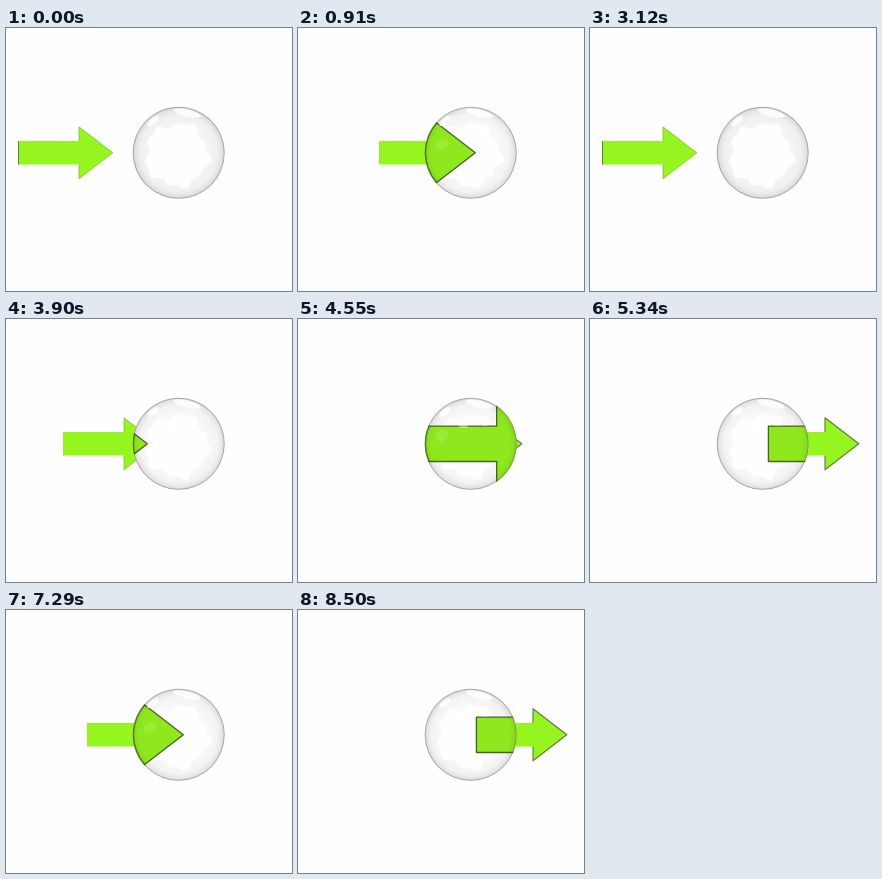
Animation, 286 px wide and 263 px high, one loop 8630 ms. Source, as an HTML page with a canvas:

```html
<!DOCTYPE html>
<html lang="en">
<head>
<meta charset="utf-8">
<title>Arrow through a glass ball</title>
<style>
  html, body { margin: 0; width: 100%; height: 100%; overflow: hidden; background: #fefefe; }
  canvas { display: block; }
</style>
</head>
<body>
<canvas id="stage" width="286" height="263"></canvas>
<script>
const ctx = document.getElementById('stage').getContext('2d');
const LOOP = 8630;
const TICK = 130;
const STEPS_PER_PASS = 13;
const BALL = { x: 172.7, y: 124.8, r: 46 };
const ZOOM = 1.5;
const ARROW = { tail: 12, neck: 73, tip: 106.8, shaft: 11.8, head: 26 };

// Eight steps take fifteen ticks.
function stepAt(time) {
  const tick = Math.floor(time / TICK);
  return 1 + Math.floor((tick - 1) * 8 / 15);
}

// Each pass eases from left to right, already two steps under way when the loop begins.
function offsetAt(step) {
  const t = (step + 2) % STEPS_PER_PASS / STEPS_PER_PASS;
  const eased = t ** 3 * (6 * t * t - 15 * t + 10);
  return Math.round(-5 + 172 * eased);
}

function headPath({ neck, tip, shaft, head }) {
  const path = new Path2D();
  path.moveTo(neck, -shaft);
  path.lineTo(neck, -head);
  path.lineTo(tip, 0);
  path.lineTo(neck, head);
  path.lineTo(neck, shaft);
  return path;
}

function arrowPath(shape) {
  const path = headPath(shape);
  path.lineTo(shape.tail, shape.shaft);
  path.lineTo(shape.tail, -shape.shaft);
  path.closePath();
  return path;
}

const HEAD_EDGE = headPath(ARROW);
const OUTER_ARROW = arrowPath(ARROW);
const INNER_ARROW = arrowPath({ ...ARROW, tail: 14.5 });

function stroke(path, color, width) {
  ctx.strokeStyle = color;
  ctx.lineWidth = width;
  ctx.stroke(path);
}

function ellipse(x, y, rx, ry, turn, color) {
  ctx.beginPath();
  ctx.ellipse(x, y, rx, ry, turn, 0, 2 * Math.PI);
  ctx.fillStyle = color;
  ctx.fill();
}

function circle(radius, from = 0, to = 2 * Math.PI) {
  const path = new Path2D();
  path.arc(BALL.x, BALL.y, radius, from, to);
  return path;
}

// Bright ragged patch in the middle of the glass.
function glowPath() {
  const path = new Path2D();
  for (let a = 0; a < 2 * Math.PI; a += 0.1) {
    const r = 31 + 2.5 * Math.sin(5 * a + 1) + 2 * Math.sin(11 * a);
    path.lineTo(171 + r * Math.cos(a), 127 + r * Math.sin(a));
  }
  path.closePath();
  return path;
}

function ballGradient(...stops) {
  const gradient = ctx.createRadialGradient(BALL.x, BALL.y, 0, BALL.x, BALL.y, BALL.r);
  stops.forEach(([at, color]) => gradient.addColorStop(at, color));
  return gradient;
}

const LENS = circle(BALL.r);
const GLOW = glowPath();
const GLASS = ballGradient([0, '#fafafa'], [0.6, '#f5f5f5'], [1, '#ececec']);
const CLEAR_GLASS = ballGradient([0, '#fdfdfd'], [0.6, '#f9f9f9'], [1, '#f0f0f0']);
const RIM = ballGradient([0.84, 'rgba(60,60,60,0)'], [0.95, 'rgba(60,60,60,.07)'],
  [1, 'rgba(60,60,60,.22)']);

function drawArrow(offset) {
  const emerging = offset > 100;
  ctx.save();
  ctx.translate(offset, BALL.y);
  ctx.fillStyle = '#96f51e';
  ctx.fill(OUTER_ARROW);
  stroke(HEAD_EDGE, emerging ? '#5f7a3c' : '#79b832', emerging ? 1.1 : 0.7);
  if (offset < 20) {
    ctx.fillStyle = '#55752f';
    ctx.fillRect(ARROW.tail, -ARROW.shaft, 0.9, 2 * ARROW.shaft);
  }
  ctx.restore();
}

function drawRefraction(offset) {
  ctx.save();
  ctx.translate(BALL.x, BALL.y);
  ctx.scale(ZOOM, ZOOM);
  ctx.translate(offset - BALL.x, 0);
  ctx.fillStyle = '#8fe81e';
  ctx.fill(INNER_ARROW);
  stroke(INNER_ARROW, '#47602c', 0.9);
  ctx.clip(INNER_ARROW);
  ctx.resetTransform();
  stroke(circle(BALL.r - 0.8, 2, 4.3), 'rgba(20,60,0,.5)', 1.6);
  ctx.restore();
}

function drawBall(offset) {
  const empty = offset < 30;
  ctx.save();
  ctx.clip(LENS);
  ctx.fillStyle = empty ? GLASS : CLEAR_GLASS;
  ctx.fill(LENS);
  ctx.fillStyle = '#fefefe';
  ctx.fill(GLOW);
  drawRefraction(offset);
  ctx.fillStyle = RIM;
  ctx.fill(LENS);
  ellipse(181, 85, 14, 3.5, 0.25, 'rgba(255,255,255,.85)');
  ellipse(147, 93, 7, 3, -0.7, 'rgba(255,255,255,.85)');
  if (!empty) {
    ellipse(165, 106, 5, 3, 0.2, 'rgba(255,255,255,.4)');
    ellipse(187, 103, 4, 4, 0, 'rgba(255,255,255,.4)');
    ellipse(144, 117, 7, 5, -0.6, 'rgba(255,255,255,.12)');
  }
  ctx.restore();
  stroke(circle(BALL.r - 0.4), 'rgba(100,100,100,.45)', 0.8);
}

function render(time) {
  const offset = offsetAt(stepAt(time % LOOP));
  ctx.fillStyle = '#fefefe';
  ctx.fillRect(0, 0, 286, 263);
  drawArrow(offset);
  drawBall(offset);
}

ctx.lineJoin = 'round';
const begin = performance.now();
function tick() {
  render(performance.now() - begin);
  requestAnimationFrame(tick);
}
tick();
</script>
</body>
</html>
```
